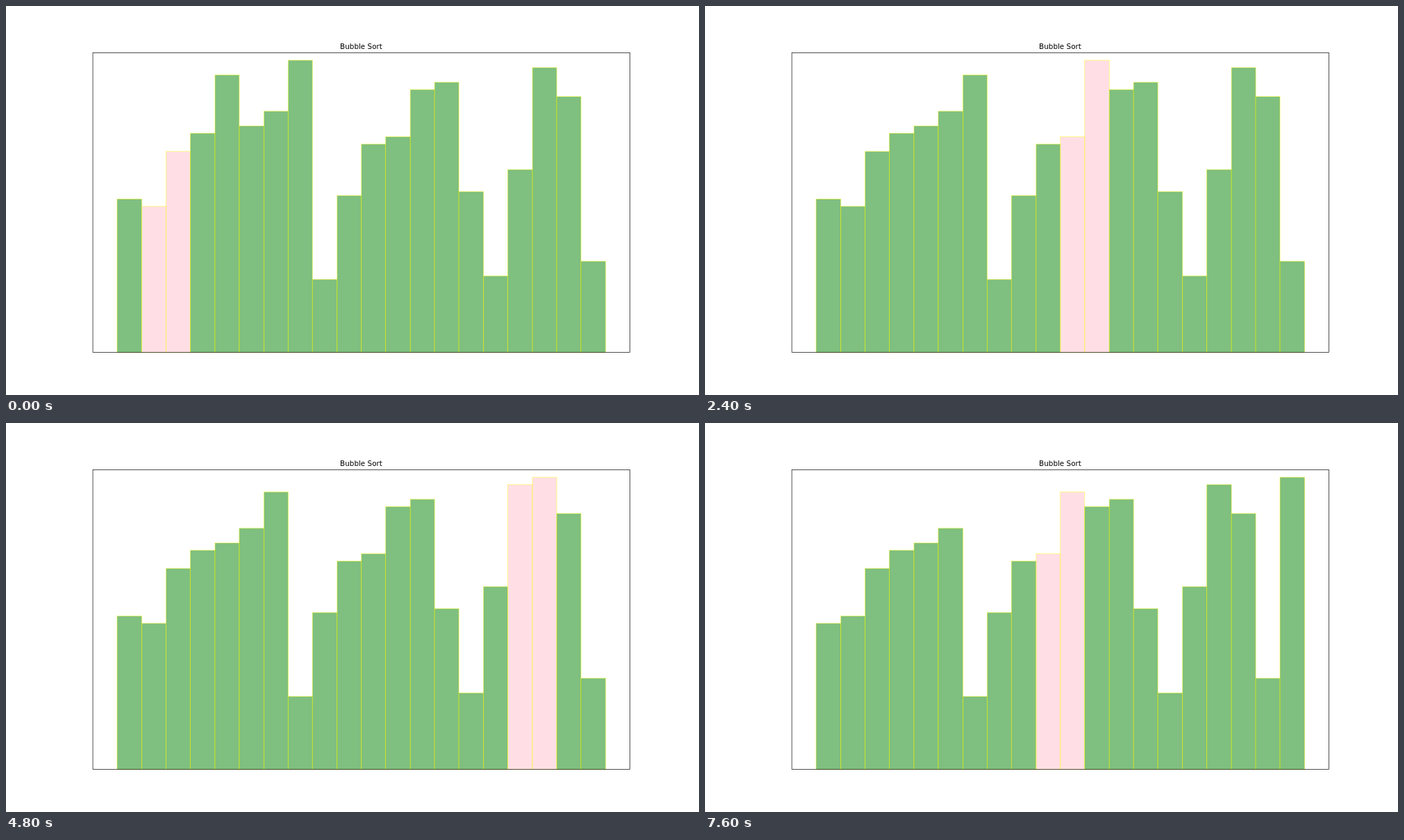
These frames come from a looping animation (998 by 561 pixels, 8000 ms). An HTML page:

```html
<!DOCTYPE html>
<html lang="en">
<head>
<meta charset="utf-8">
<title>Bubble Sort</title>
<style>
  html, body { margin: 0; width: 100%; height: 100%; overflow: hidden; background: #fff; }
  svg { display: block; width: 998px; height: 561px; }
  #bars rect { fill: green; stroke: yellow; stroke-width: 1.39; fill-opacity: .5; stroke-opacity: .5; }
  #bars .swapped { fill: pink; }
  text { font: 16.667px "DejaVu Sans", sans-serif; text-anchor: middle; }
</style>
</head>
<body>
<svg viewBox="0 0 1600 900" preserveAspectRatio="none">
  <g id="bars"></g>
  <rect x="200.5" y="108.5" width="1240" height="693" fill="none" stroke="#000" stroke-width="1.11"/>
  <text x="820" y="99.67">Bubble Sort</text>
</svg>
<script>
const STEP = 400, COUNT = 20;
const BASE = 801, UNIT = 693 / 82;
const LEFT = 200 + 1240 / 22, WIDTH = 1240 / 22;
const values = [42, 55, 40, 60, 76, 62, 66, 80, 20, 43, 57, 59, 72, 74, 44, 21, 50, 78, 70, 25];

// One state per swap; comparisons without a swap are not shown.
function bubbleSort(list) {
  const a = [...list], states = [];
  for (let end = a.length - 1; end > 0; end--) {
    for (let i = 0; i < end; i++) {
      if (a[i] <= a[i + 1]) continue;
      [a[i], a[i + 1]] = [a[i + 1], a[i]];
      states.push({ bars: [...a], at: i });
    }
  }
  return states;
}

const snap = v => Math.floor(v + 0.5) + 0.5;
const edge = i => snap(LEFT + WIDTH * i);
const states = bubbleSort(values).slice(0, COUNT);

const group = document.getElementById("bars");
const rects = values.map((_, i) => {
  const rect = document.createElementNS("http://www.w3.org/2000/svg", "rect");
  rect.setAttribute("x", edge(i));
  rect.setAttribute("width", edge(i + 1) - edge(i));
  return group.appendChild(rect);
});

function draw({ bars, at }) {
  rects.forEach((rect, i) => {
    const top = snap(BASE - bars[i] * UNIT);
    rect.setAttribute("y", top);
    rect.setAttribute("height", snap(BASE) - top);
    rect.classList.toggle("swapped", i === at || i === at + 1);
  });
}

const start = performance.now();
let shown = -1;
function tick() {
  const step = Math.floor((performance.now() - start) / STEP) % COUNT;
  if (step !== shown) draw(states[shown = step]);
  requestAnimationFrame(tick);
}
tick();
</script>
</body>
</html>
```
